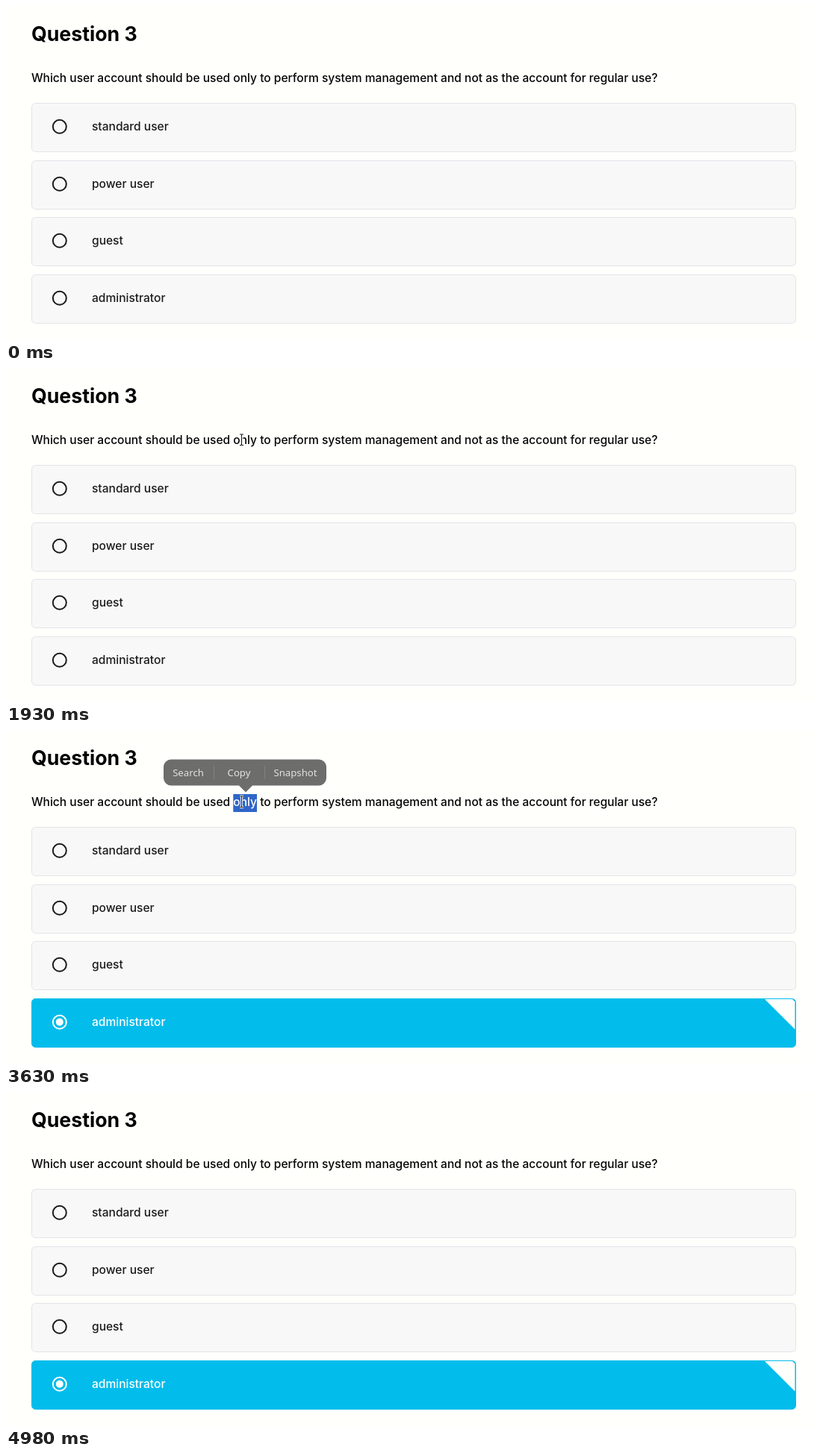
An HTML page with a canvas that plays this animation: 1082x448 px, repeating every 6150 ms.

```html
<!DOCTYPE html>
<html lang="en">
<head>
<meta charset="utf-8">
<title>Question 3</title>
<style>
  html, body { margin: 0; width: 100%; height: 100%; overflow: hidden; background: #fffffc; }
  canvas { display: block; width: 1082px; height: 448px; }
</style>
</head>
<body>
<canvas id="stage"></canvas>
<script>
const W = 1082, H = 448, LOOP = 6150;
const BLUE = '#02bceb', INK = '#1b1b1b', PAPER = '#fffffc', CARD = '#f8f8f8';
const SANS = 'Inter, "Open Sans", sans-serif';
const BODY = `500 15.55px ${SANS}`;
const QUESTION = 'Which user account should be used only to perform system management and not as the account for regular use?';
const OPTIONS = ['standard user', 'power user', 'guest', 'administrator'];
const SELECT_AT = 2470, MARK_ON = 2550, MARK_OFF = 3670;

const canvas = document.getElementById('stage');
const ctx = canvas.getContext('2d');
const dpr = window.devicePixelRatio || 1;
canvas.width = W * dpr;
canvas.height = H * dpr;

const clamp = v => Math.max(0, Math.min(1, v));
const ramp = (t, a, b) => clamp((t - a) / (b - a));
const smooth = u => u * u * (3 - 2 * u);
const mix = (a, b, u) => a + (b - a) * u;
const cardY = i => 130.5 + Math.round(i * 76.6);

// Pointer hotspot at time t, or null while it is off the stage
function pointer(t) {
  if (t < 760 || t >= 4980) return null;
  if (t < 1930) {
    const p = 1 - Math.pow(1 - ramp(t, 760, 1930), 1.78);
    return { x: mix(234, 315, p), y: mix(452, 96, p) };
  }
  const keys = [[4050, 315, 96], [4290, 227, 354], [4650, 290, 90], [4980, 250, 452]];
  let [x, y] = keys[0].slice(1);
  for (let i = 1; i < keys.length; i++) {
    const u = smooth(ramp(t, keys[i - 1][0], keys[i][0]));
    x += (keys[i][1] - keys[i - 1][1]) * u;
    y += (keys[i][2] - keys[i - 1][2]) * u;
  }
  return { x, y };
}

function cardAt(p) {
  return p ? OPTIONS.findIndex((_, i) => p.y >= cardY(i) && p.y <= cardY(i) + 65) : -1;
}

// Highlight starts at once and fades shortly after the pointer leaves
function hover(i, t) {
  for (let lag = 0; lag < 45; lag += 5) {
    if (cardAt(pointer(t - lag)) === i) return 1 - ramp(lag, 25, 45);
  }
  return 0;
}

function text(str, x, y, font, color, align = 'left') {
  ctx.font = font;
  ctx.fillStyle = color;
  ctx.textAlign = align;
  ctx.fillText(str, x, y);
}

function box(x, y, w, h, r) {
  ctx.beginPath();
  ctx.roundRect(x, y, w, h, r);
}

function poly(points) {
  ctx.beginPath();
  points.forEach(([x, y]) => ctx.lineTo(x, y));
  ctx.closePath();
}

function radio(y, color) {
  ctx.beginPath();
  ctx.arc(71.8, y, 9, 0, Math.PI * 2);
  ctx.strokeStyle = color;
  ctx.lineWidth = 2;
  ctx.stroke();
}

function cardFace(i, y, fill, border, ink) {
  box(34.5, y, 1023, 65, 5);
  ctx.fillStyle = fill;
  ctx.fill();
  ctx.shadowColor = 'transparent';
  ctx.strokeStyle = border;
  ctx.lineWidth = 1;
  ctx.stroke();
  radio(y + 31.3, ink);
  text(OPTIONS[i], 115, y + 36.5, BODY, ink);
}

function card(i, t) {
  const y = cardY(i);
  if (i === 3 && t >= SELECT_AT) {
    cardFace(i, y, BLUE, BLUE, '#fff');
    ctx.beginPath();
    ctx.arc(71.8, y + 31.3, 5, 0, Math.PI * 2);
    ctx.fill();
    poly([[1016, y + .5], [1053, y + .5], [1056.5, y + 4], [1056.5, y + 41]]);
    ctx.fillStyle = PAPER;
    ctx.fill();
    return;
  }
  cardFace(i, y, CARD, '#e4e4ea', INK);
  const a = hover(i, t);
  if (!a) return;
  ctx.save();
  ctx.globalAlpha = a;
  ctx.shadowColor = 'rgba(0, 0, 0, .16)';
  ctx.shadowBlur = 9 * dpr;
  ctx.shadowOffsetY = 2 * dpr;
  cardFace(i, y, '#fbfbfb', BLUE, BLUE);
  ctx.restore();
}

function question(t) {
  text('Question 3', 34, 47, `bold 26.7px ${SANS}`, '#000');
  text(QUESTION, 34, 102, BODY, '#050505');
  if (t < MARK_ON || t >= MARK_OFF) return;
  const start = 34 + ctx.measureText('Which user account should be used ').width;
  const wide = ctx.measureText('only').width;
  ctx.fillStyle = '#2f66c8';
  ctx.fillRect(start, 86, wide, 24);
  text('only', start, 102, BODY, '#fff');
}

function popup(t) {
  const a = ramp(t, 2550, 2840) * (1 - ramp(t, 3600, 3830));
  if (!a) return;
  ctx.save();
  ctx.globalAlpha = a;
  ctx.fillStyle = '#575757';
  box(211, 39.5, 218, 35, 10);
  ctx.moveTo(312, 74.5);
  ctx.lineTo(330, 74.5);
  ctx.lineTo(321, 83.5);
  ctx.fill();
  ctx.fillStyle = '#858585';
  ctx.fillRect(278, 48, 1, 18);
  ctx.fillRect(346, 48, 1, 18);
  const font = '13.2px "Noto Sans", "Open Sans", sans-serif';
  [['Search', 244], ['Copy', 312], ['Snapshot', 387.5]]
    .forEach(([s, x]) => text(s, x, 62, font, '#f4f4f4', 'center'));
  ctx.restore();
}

function outlined() {
  ctx.strokeStyle = '#fff';
  ctx.lineWidth = 2.4;
  ctx.lineJoin = 'round';
  ctx.stroke();
  ctx.fillStyle = INK;
  ctx.fill();
}

function arrow() {
  poly([[0, 0], [0, 16], [7, 18], [11.5, 11.5]]);
  outlined();
}

function hand() {
  poly([[-2.5, 0], [-1, -1.5], [.5, 0], [1, 5], [4, 5], [8.5, 7], [9, 10],
    [7.5, 15], [0, 15], [-2, 12], [-5.5, 8], [-5, 6.5], [-1.8, 8.5]]);
  outlined();
}

function beam() {
  const stroke = (color, width) => {
    ctx.beginPath();
    ctx.moveTo(-2.5, -7);
    ctx.lineTo(2.5, -7);
    ctx.moveTo(0, -7);
    ctx.lineTo(0, 7.5);
    ctx.moveTo(-2.5, 7.5);
    ctx.lineTo(2.5, 7.5);
    ctx.strokeStyle = color;
    ctx.lineWidth = width;
    ctx.stroke();
  };
  stroke('#fff', 3);
  stroke(INK, 1.1);
}

function cursor(t) {
  const p = pointer(t);
  if (!p) return;
  ctx.save();
  ctx.translate(p.x + .5, p.y);
  if (cardAt(p) >= 0) hand();
  else if (p.y > 84 && p.y < 111) beam();
  else arrow();
  ctx.restore();
}

function draw(t) {
  ctx.setTransform(dpr, 0, 0, dpr, 0, 0);
  ctx.fillStyle = PAPER;
  ctx.fillRect(0, 0, W, H);
  question(t);
  OPTIONS.forEach((_, i) => card(i, t));
  popup(t);
  cursor(t);
}

const begin = performance.now();
function frame() {
  draw((performance.now() - begin) % LOOP);
  requestAnimationFrame(frame);
}
frame();
</script>
</body>
</html>
```
